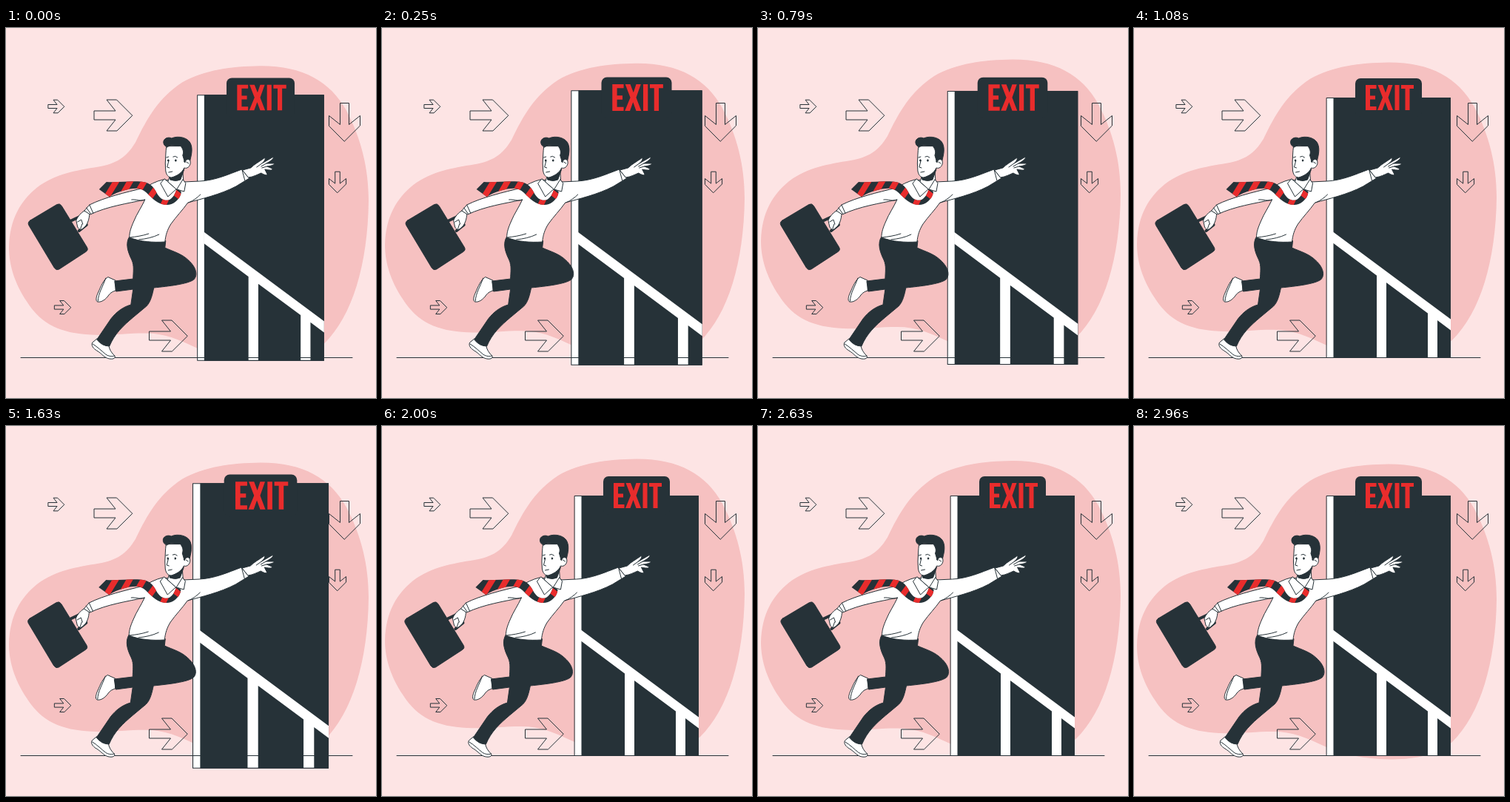
An HTML page for the animation above (3000 ms loop, 500x500 px).

```html
<!DOCTYPE html>
<html lang="en">
<head>
<meta charset="utf-8">
<title>Running to the exit</title>
<style>
html, body { margin: 0; width: 100%; height: 100%; overflow: hidden; background: #fde4e4; }
svg { display: block; width: 100%; height: 100%; }
.dark { fill: #263238; }
.white { fill: #fff; }
.red { fill: #e92c2c; }
.line { fill: none; }
.ink { stroke: #263238; stroke-width: 1; stroke-linecap: round; stroke-linejoin: round; }
.handle { stroke-width: 4; }
.stripes { stroke: #e92c2c; stroke-width: 8; }
#arrow { vector-effect: non-scaling-stroke; }
</style>
</head>
<body>
<svg viewBox="0 0 500 500">
  <defs>
    <path id="arrow" d="M0 0L-21-21H-34.5L-22.5-6H-51.5V6H-22.5L-34.5 21H-21Z"/>
    <path id="tie" d="M136 208L126 218L140 228C154 220 168 216 180 217C190 219 196 231 206 236C214 240 223 240 229 235C234 231 237 226 237 221L231 217C229 224 226 230 220 232.500C213 234 208 230 204 223C199 213 193 208 182 207.500C167 206.500 151 209 136 208Z"/>
    <clipPath id="tieClip"><use href="#tie"/></clipPath>
  </defs>

  <path id="blob" fill="#f6c1c1" d="M343 51.6C400 51 438 72 460 112C480 150 490 190 490 234C489 320 468 390 430 427C405 447 375 450.500 345 450.500C310 450 285 444 258 433C232 421 215 413 188 413C160 413 140 416.500 115 415C75 413 48 402 28 370C10 343 4 318 4 297C5 258 20 234 42 216C68 197 95 193 125 188C149 184 163 175 175 155C191 122 206 95 238 74C268 57 305 52 343 51.600Z"/>

  <g id="arrows" class="line ink"></g>

  <g id="door">
    <rect class="white ink" x="260.500" y="94.500" width="167" height="351"/>
    <rect class="dark" x="269.500" y="94" width="158.500" height="352"/>
    <path class="white" d="M269 275.500L428 393.500V408.500L410 395V445H397V385.500L341 344V445H328V334.500L269 290.500Z"/>
  </g>
  <g id="sign">
    <rect class="dark" x="299" y="68" width="90" height="52" rx="7"/>
    <path class="red" role="img" aria-label="EXIT" d="M313 77H327.500V82H319V91.500H326V96.500H319V106H327.500V111H313ZM329.500 77H336L340 87.500L343.500 77H349.500L343.500 94L350 111H343.500L339.500 100L335.500 111H329L336 94ZM352.500 77H358.500V111H352.500ZM361 77H378V82H372.500V111H366.500V82H361Z"/>
  </g>
  <path class="line ink" d="M20 445.500H468"/>

  <g id="man" class="ink">
    <!-- briefcase and rear hand -->
    <g class="handle"><path class="line" d="M87 261L101 254.500Q104 253 105 256L109 266L99 274"/></g>
    <path class="dark" d="M33 260L69 238.500Q73 236.500 75.500 240.500L109.500 296Q112 300 108 302.500L72 326Q68 328 65.500 324L31 266.500Q29 262.500 33 260Z"/>
    <path class="white" d="M106 247C101 250 97 255 95 260L97 269C99 273 103 273 105 270C110 267 113 258 113 251Z"/>
    <path class="line" d="M97 262L102 259L104 265M101 271L103 265"/>

    <!-- shoes -->
    <path class="white" d="M148 341L138 336.500C132 340 128 350 125 357C122 363 121 369 124 370C129 371 135 367 139 361C142 357 145 356 148 355Z"/>
    <path class="line" d="M135 338C131 350 125 358 124.500 369"/>
    <path class="white" d="M123 420L117 425C115 429 118 433 123 436C130 440 133 446 140 447C145 448 149 446 147 443C143 439 140 435 139 429Z"/>
    <path class="line" d="M117.500 427C124 431 130 437 135 441C139 444 144 444 147 443"/>

    <!-- trousers -->
    <path class="dark" d="M167 282C161 291 165 303 170 313C174 322 172 330 172 339L147 342L149 356L172 353L169 374C158 377 149 384 142 393L123 421Q130 430 140 430C147 413 159 402 172 391L190 376C196 370 198 360 200 351C220 349 246 346 254 340C260 334 257 323 247 314C238 305 226 302 215 297L216 288Z"/>

    <!-- shirt -->
    <path class="white" d="M212 205C203 207 194 212 187 216C162 222 133 229 113 239L106 247L114 252C137 241 165 237 188 232C183 243 177 251 173 261C169 270 167 276 167 283C182 289 199 290 215 289C216 280 218 273 223 265C230 255 239 246 246 236C264 231 290 225 311 214L329 203L319 191C300 198 283 206 262 207L240 208Z"/>
    <path class="line" d="M188 232C183 235 175 231 170 232M113 239L118 250M109 243L115 251.500M319 191L323 206M247 236C254 233 259 229 263 225M168 283C176 282 184 281 193 278M180 286C189 285 199 283 207 279"/>

    <!-- reaching hand -->
    <path class="white" d="M320 192L331 189C336 184 342 181 349 176C352 175 350 180 346 183L360 175C363 174 362 178 352 183L362 183C364 184 361 186 353 187L360 190C361 193 356 192 350 191L353 197C354 200 350 199 345 196C340 198 335 201 328 202Z"/>
    <path class="line" d="M346 183L339 188M352 183L345 187M353 187L346 189"/>

    <!-- neck, collar and tie -->
    <path class="white" d="M222 198L219 208L231 219L240 207L239 192Z"/>
    <path class="dark" d="M221 199L222 205Q230 208 236 205L241 191Z"/>
    <use href="#tie" class="dark" stroke="none"/>
    <g clip-path="url(#tieClip)" class="stripes">
      <path class="line" d="M134 232L153 201M156 228L171 202M177 224L190 202M190 235L208 210M210 245L219 226M224 219L237 229"/>
    </g>
    <path class="white" d="M214 204L209 210L219 228L230 218Z"/>
    <path class="white" d="M239 205L231 218L241 221L243 210Z"/>

    <!-- head -->
    <path class="white" d="M217 160C216 167 216 175 215.500 183L216 193C217 199 220 202 224 202C231 200 238 196 241 189C246 191 251 185 249 179C247 175 243 177 241 181L244 160Z"/>
    <path class="dark" d="M214 158C210 151 218 146 224 149C233 145 247 148 250 157C253 165 250 174 249 179C246 176 243 178 242 182L239 172C241 167 239 163 236 159C229 160 223 157 218 161Z"/>
    <path class="line" d="M217 175L220 174M226 174Q229 172 232 175M220 180L218 188L221 189M220 195L225 194M244 181L247 183"/>
    <ellipse class="dark" cx="219.500" cy="179" rx=".7" ry="1.300"/>
    <ellipse class="dark" cx="229.500" cy="179" rx=".7" ry="1.300"/>
  </g>
</svg>
<script>
const PERIOD = 1500, LEAD = 32;
const $ = id => document.getElementById(id);

// tip x, tip y, scale, rotation
$('arrows').innerHTML = [
  [78.5, 106, .42, 0], [170.5, 118, 1, 0], [245, 416, 1, 0],
  [87.5, 377.5, .43, 0], [457.5, 153, 1, 90], [448, 222.5, .55, 90]
].map(([x, y, s, r]) =>
  `<use href="#arrow" transform="translate(${x} ${y}) rotate(${r}) scale(${s})"/>`).join('');

// value per tenth of the period, joined linearly
const shake = [0, -1, 2, -4, 4, -4, 4, -4, 2, -1, 0];
const beat = [1, 1.1, 1.05, 1, 1, 1.1, 1, 1, 1, 1, 1];

function track(keys, p) {
  const i = Math.floor(p * 10);
  return keys[i] + (keys[i + 1] - keys[i]) * (p * 10 - i);
}

function move(id, value) {
  $(id).setAttribute('transform', value);
}

function draw() {
  const p = (performance.now() + LEAD) % PERIOD / PERIOD;
  const scale = track(beat, p);
  const about = (x, y) => `translate(${x} ${y}) scale(${scale}) translate(${-x} ${-y})`;
  move('blob', `translate(0 ${-10 * (1 - Math.abs(1 - 2 * p))})`);
  move('man', `translate(${track(shake, p)} 0)`);
  move('door', about(344, 270));
  move('sign', about(344, 94));
  requestAnimationFrame(draw);
}
draw();
</script>
</body>
</html>
```
